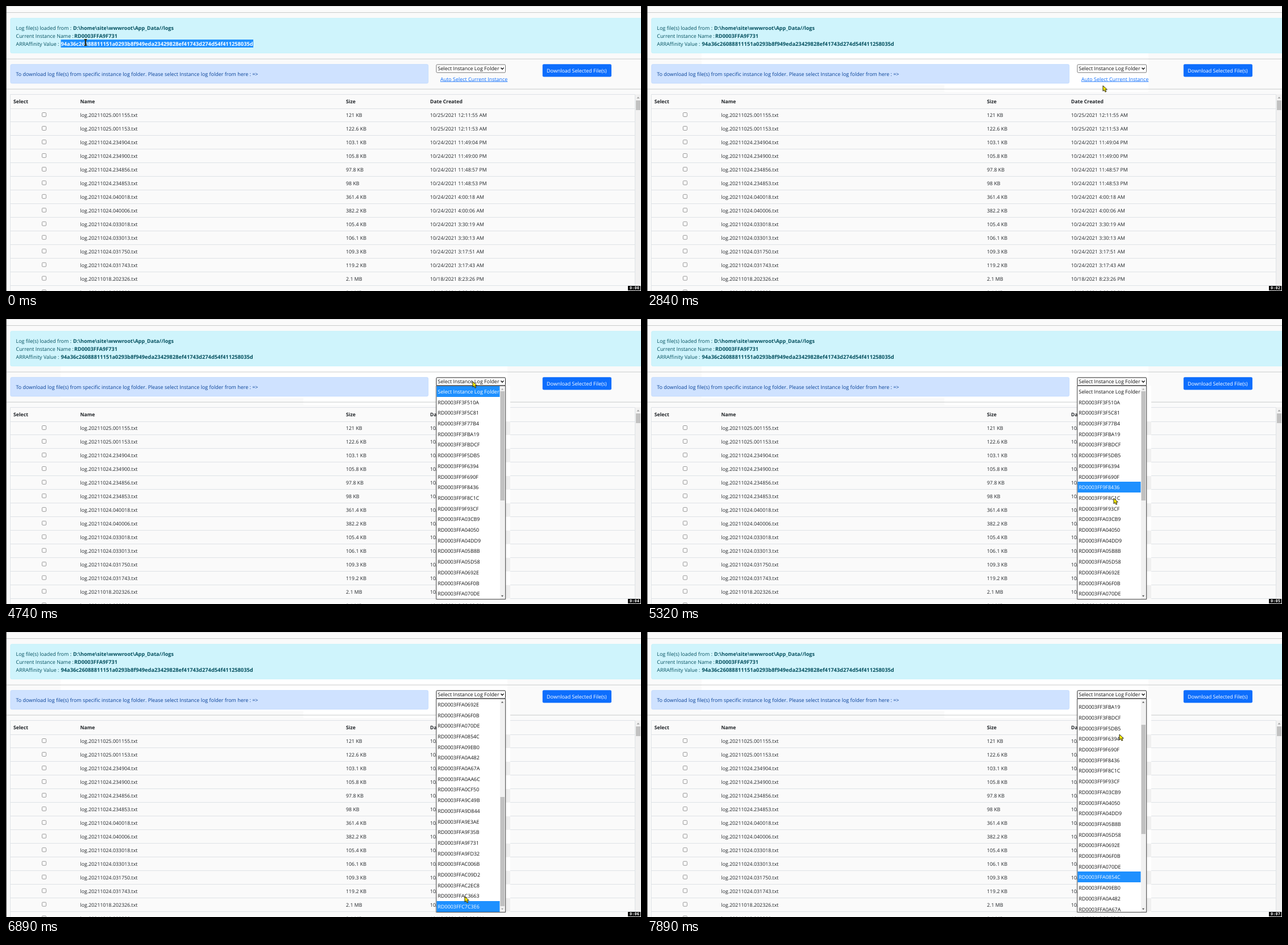
Recreate the animation shown at these times as an HTML page. Size 1117 px wide and 501 px high, loop 8000 ms.

```html
<!DOCTYPE html>
<html lang="en">
<head>
<meta charset="utf-8">
<title>Log files</title>
<style>
html, body { margin: 0; width: 100%; height: 100%; overflow: hidden; background: #fafafa; }
svg { display: block; }
text { font: 8.95px "Open Sans", "Noto Sans", sans-serif; fill: #212529; white-space: pre; text-rendering: geometricPrecision; }
.cell { font-size: 8.83px; }
.head { font-size: 8.7px; font-weight: 700; }
.info { fill: #055160; }
.bold { font-weight: 700; }
.note { fill: #084298; }
.link { fill: #0d6efd; text-decoration: underline; }
.white { fill: #fff; }
.opt { fill: #111; }
.clock { font: 700 7px "DejaVu Sans Mono", monospace; fill: #fff; }
.popup { filter: drop-shadow(0 0 1.5px rgba(0, 0, 0, .25)); }
</style>
</head>
<body>
<svg id="stage" width="1117" height="501" viewBox="0 0 1117 501"></svg>
<script>
const LOOP = 8000, TICK = 125, LATE = 55;
const ROW = 23.97, ITEM = 18.7, SHOWN = 20, TOP = 117.8;
const BLUE = '#1e90ff', LINE = '#dee2e6';
const stage = document.getElementById('stage');

function el(tag, attrs, parent = stage, content) {
  const node = document.createElementNS('http://www.w3.org/2000/svg', tag);
  set(node, attrs);
  if (content !== undefined) node.textContent = content;
  parent.appendChild(node);
  return node;
}
function set(node, attrs) {
  for (const k in attrs) node.setAttribute(k, attrs[k]);
}
const box = (x, y, width, height, fill, more = {}, parent) =>
  el('rect', { x, y, width, height, fill, ...more }, parent);
const text = (x, y, cls, str, parent) => el('text', { x, y, class: cls }, parent, str);
const path = (d, attrs, parent) => el('path', { d, ...attrs }, parent);
const show = (node, on) => node.setAttribute('visibility', on ? 'visible' : 'hidden');
const clip = (id, x, y, w, h) => box(x, y, w, h, '#000', {}, el('clipPath', { id }));
const clamp = (v, lo, hi) => Math.min(hi, Math.max(lo, v));
const thin = (stroke, rx) => ({ stroke, rx, 'stroke-width': .6 });

// Page background; two patches turn white once the pointer has passed
const patch1 = box(96, 83, 489, 56, '#fff');
const patch2 = box(523, 83, 359, 68, '#fff');
box(0, 0, 1117, 1, '#dedfe0');
for (const y of [11, 92.6, 145.6]) box(1, y, 1116, 1, '#c9cacb');

// Info panel
box(7.9, 21.4, 1112, 61.3, '#cff4fc', thin('#b6effb', 2.3));
text(17.5, 41.5, 'info', 'Log file(s) loaded from :');
text(17.5, 55.5, 'info', 'Current Instance Name :');
text(17.5, 69.5, 'info', 'ARRAffinity Value :');
function drawValues(cls, parent) {
  const value = (x, y, size, str) => {
    text(x, y, cls + ' bold', str, parent).style.fontSize = size + 'px';
  };
  value(118, 41.5, 9.04, 'D:\\home\\site\\wwwroot\\App_Data//logs');
  value(120, 55.5, 9.2, 'RD0003FFA9F731');
  value(96.5, 69.5, 9.31, '94a36c26088811151a0293b8f949eda23429828ef41743d274d54f411258035d');
}
drawValues('info');
const mark = box(0, 0, 0, 14, BLUE);
const markClip = clip('markClip', 0, 0, 0, 14);
drawValues('white', el('g', { 'clip-path': 'url(#markClip)' }));

// Folder row
box(7.9, 102.6, 734.8, 33.3, '#cfe2ff', thin('#b6d4fe', 2.3));
text(17.5, 123, 'note', 'To download log file(s) from specific instance log folder. Please select Instance log folder from here : =>');
text(764, 131.5, 'link', 'Auto Select Current Instance');
box(943.8, 102.3, 121.2, 22.2, '#0d6efd', { rx: 2.3 });
text(951, 117, 'white', 'Download Selected File(s)');

// File table; "+" marks files created one second after their name
const files = [
  '25 001155 121 KB', '25 001153 122.6 KB', '24 234904 103.1 KB', '24 234900 105.8 KB',
  '24 234856 97.8 KB +', '24 234853 98 KB', '24 040018 361.4 KB', '24 040006 382.2 KB',
  '24 033018 105.4 KB +', '24 033013 106.1 KB', '24 031750 109.3 KB +', '24 031743 119.2 KB',
  '18 202326 2.1 MB', '18 202308 2.1 MB'
];
function created(day, hms, late) {
  const [h, m, s] = hms.match(/../g);
  const sec = String(+s + (late ? 1 : 0)).padStart(2, '0');
  return `10/${day}/2021 ${h % 12 || 12}:${m}:${sec} ${h < 12 ? 'AM' : 'PM'}`;
}
const columns = [13, 130.5, 598, 746];
path('M7.5 501V155.5H1106.5V501', { fill: 'none', stroke: LINE });
['Select', 'Name', 'Size', 'Date Created'].forEach((str, i) => text(columns[i], 171.2, 'head', str));
files.forEach((file, i) => {
  const [day, hms, size, unit, late] = file.split(' ');
  const y = 195.2 + i * ROW;
  const cells = [`log.202110${day}.${hms}.txt`, size + ' ' + unit, created(day, hms, late)];
  box(8, Math.round(y - 15.7), 1099, 1, LINE);
  box(63.5, y - 7.7, 7, 7, '#fff', { ...thin('#767676', 1.3), 'stroke-width': .75 });
  cells.forEach((str, c) => text(columns[c + 1], y, 'cell', str));
});
box(1107, 155, 10, 346, '#f1f1f1');
box(1108, 166, 8, 17, '#c1c1c1');
path('M1109.5 162.5h5l-2.5-3z', { fill: '#a3a3a3' });
box(0, 0, 1, 501, '#444');

// Select box
const select = box(757, 103, 121.5, 14, '#fff', { rx: 1.5 });
text(759.5, 113.3, 'opt', 'Select Instance Log Folder');
path('M870.5 108.5l2.5 2.7 2.5-2.7', { fill: 'none', stroke: '#111', 'stroke-width': 1.4 });

// Open list
const names = ('3F510A 3F5C81 3F77B4 3FBA19 3FBDCF 9F5DB5 9F6394 9F690F 9F8436 9F8C1C 9F93CF ' +
  'A03CB9 A04050 A04DD9 A05B8B A05D58 A0692E A06F0B A070DE A0854C A09EB0 A0A482 A0A67A ' +
  'A0AA6C A0CF50 A9C49B A9D844 A9E3AE A9F35B A9F731 A9FD32 AC006B AC09D2 AC2EC8 AC3663 ' +
  'C7C3E6').split(' ').map(n => 'RD0003FF' + n);
names.unshift('Select Instance Log Folder');
const MAX = (names.length - SHOWN) * ITEM;

const list = el('g', {});
box(878, 117, 9, 375, '#fff', {}, list);
for (let y = 180; y < 480; y += 2 * ROW) box(878, y, 9, ROW, '#f0f0f0', {}, list);
box(757, 117.5, 121.5, 375, '#fff', { stroke: '#555', class: 'popup' }, list);
clip('listClip', 757.5, 118, 111, 374);
const items = el('g', {}, el('g', { 'clip-path': 'url(#listClip)' }, list));
const bar = box(757, 0, 112, 19, BLUE, {}, items);
const options = names.map((n, i) => text(759.5, TOP + 13.1 + i * ITEM, 'opt', n, items));
box(869, 118, 9, 374, '#f1f1f1', {}, list);
const thumb = box(869.5, 127, 7.5, 192, '#c1c1c1', {}, list);
const up = path('M871 124.5h4l-2-2.6z', {}, list);
const down = path('M871 485.8h4l-2 2.6z', {}, list);

// Clock
box(1094, 492, 22, 8, '#000');
const clock = text(1097, 498.4, 'clock', '');

// Pointers
const arrow = path('M0 0V9.6L2.3 7.6 4 11.2 5.9 10.3 4.2 6.9H7.4Z',
  { fill: '#ffee00', stroke: '#111', 'stroke-width': .9, 'stroke-linejoin': 'round' });
const beam = el('g', { fill: 'none' });
const beamShape = 'M-2.2 -4.8H2.2M0 -4.8V4.8M-2.2 4.8H2.2';
path(beamShape, { stroke: '#111', 'stroke-width': 2.2 }, beam);
path(beamShape, { stroke: '#6b6410', 'stroke-width': .7 }, beam);

// Pointer stops: arrival time and place. It rests, then travels for at most TRAVEL ms.
const TRAVEL = 375;
const stops = [
  [0, 140, 64], [375, 577, 128], [875, 209, 43], [1450, 143, 41], [2125, 176, 53],
  [2750, 802, 140], [3575, 159, 116], [3875, 230, 119], [4250, 717, 137], [4500, 821, 110],
  [5375, 821, 315], [5800, 821, 437], [6375, 812, 300], [6750, 808, 491], [6875, 807, 465],
  [7550, 831, 180]
];
function pointerAt(t) {
  const i = stops.findIndex(s => s[0] >= t);
  if (i < 0) return stops.at(-1).slice(1);
  const [end, x, y] = stops[i], [begin, x0, y0] = stops[Math.max(0, i - 1)];
  const span = Math.min(TRAVEL, end - begin) || 1;
  const p = clamp(1 - (end - t) / span, 0, 1);
  return [x0 + (x - x0) * p, y0 + (y - y0) * p];
}

// The wheel rolls the list down to its end, later part of the way back
const OPEN = 4625, WHEEL_DOWN = 5375, WHEEL_UP = 7600;
function scrollAt(t) {
  const p = clamp((t - WHEEL_DOWN) / 660, 0, 1);
  return MAX * (1 - (1 - p) ** 3) - Math.max(0, t - WHEEL_UP) * .9;
}

// The highlight trails the pointer slightly and stays put while the list rolls back
function pickAt(t) {
  const seen = Math.min(t - 45, WHEEL_UP);
  const offset = pointerAt(seen)[1] - TOP + scrollAt(seen);
  return clamp(Math.floor(offset / ITEM), 0, names.length - 1);
}

function markAt(t) {
  if (t < 375) return { x: 96.5, y: 59, width: 338.5 };
  if (t > 1600 && t < 1875) return { x: 131, y: 31, width: 25.5 };
  if (t > 2200 && t < 2875) return { x: 120, y: 45, width: 77 };
  return { x: 0, y: 0, width: 0 };
}

function render(now) {
  const t = Math.floor((now % LOOP + LATE) / TICK) * TICK % LOOP;
  show(patch1, t >= 125);
  show(patch2, t >= 2750);
  set(mark, markAt(t));
  set(markClip, markAt(t));

  const open = t >= OPEN, scroll = scrollAt(t), pick = pickAt(t);
  show(list, open);
  set(select, { stroke: open ? '#222' : '#767676' });
  set(items, { transform: `translate(0 ${-scroll})` });
  set(bar, { y: Math.round(TOP + pick * ITEM - scroll) + scroll });
  options.forEach((o, i) => o.setAttribute('class', i === pick ? 'white' : 'opt'));
  set(thumb, { y: 127 + scroll / MAX * 163 });
  set(up, { fill: scroll > 0 ? '#505050' : '#a3a3a3' });
  set(down, { fill: scroll < MAX ? '#505050' : '#a3a3a3' });

  const [x, y] = pointerAt(t);
  const overText = x > 17 && x < 445 && (y < 73 || y > 111 && y < 127);
  show(arrow, !overText);
  show(beam, overText);
  set(overText ? beam : arrow, { transform: `translate(${x} ${y})` });

  clock.textContent = '0:0' + Math.floor(t / 1000);
}

function frame() {
  render(performance.now());
  requestAnimationFrame(frame);
}
frame();
</script>
</body>
</html>
```
